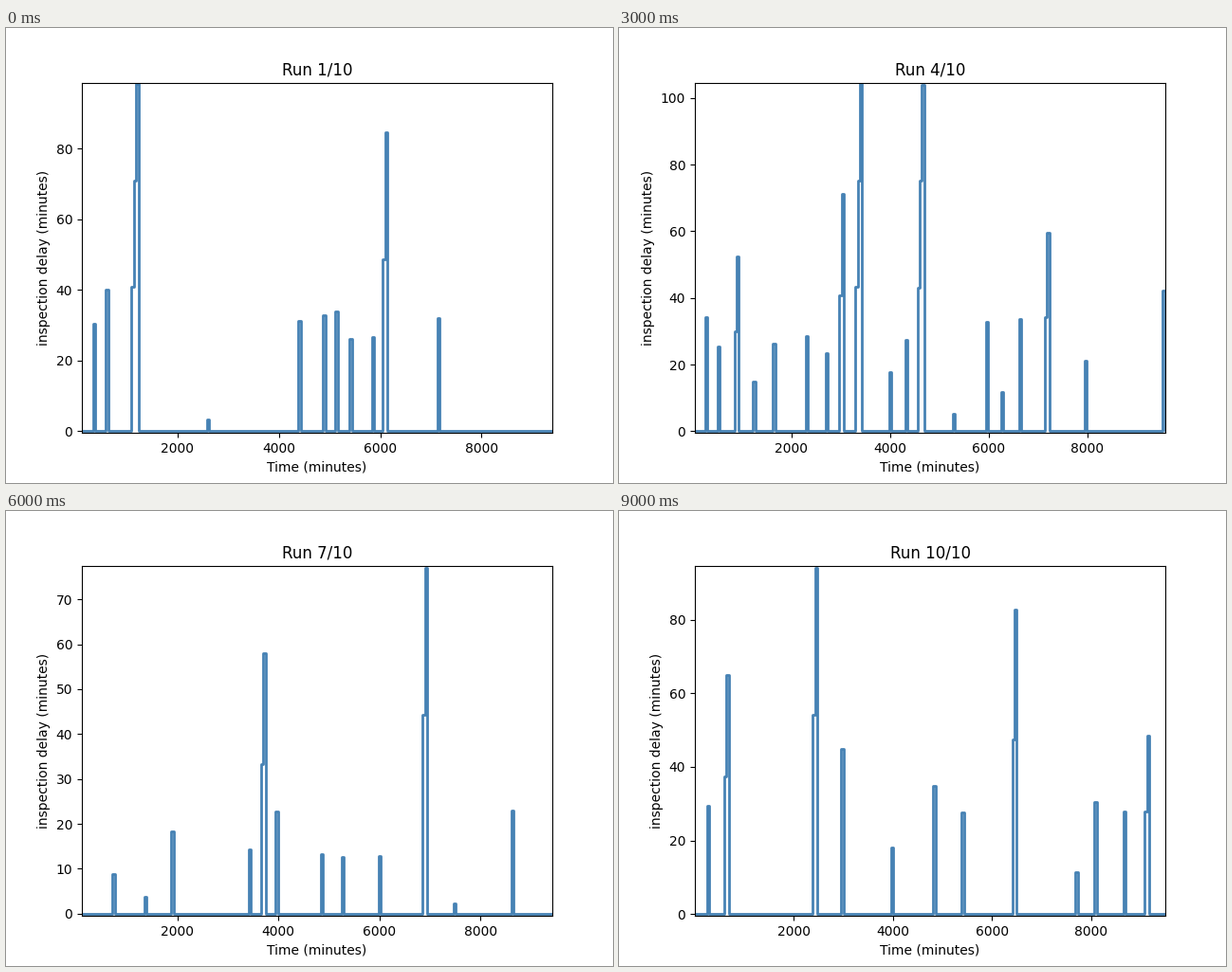
A matplotlib script for the animation above (10 s loop, 640 px wide and 480 px high).

```python
import matplotlib.pyplot as plt
import numpy as np
from matplotlib.animation import FuncAnimation

STEP = 45      # minutes a delay level lasts
CLEAR = 230    # free minutes kept around each burst

# First and last minute, number of minor bursts, main bursts (time, peak delay)
RUNS = [
    (108, 9400, 5, [(585, 40.2), (1181, 98.2), (4382, 31.3), (5112, 33.8),
                    (5835, 26.6), (6096, 84.6)]),
    (95, 9390, 11, [(2600, 62), (8640, 14)]),
    (49, 9310, 10, [(92, 79.9), (3413, 47.9), (3928, 68.9), (5229, 47.2),
                    (6484, 31.7), (7809, 41.5)]),
    (51, 9574, 13, [(895, 52.4), (3023, 71.1), (3393, 104.1), (4649, 103.9),
                    (7183, 59.5), (9520, 42.1)]),
    (223, 9451, 4, [(1056, 44.8), (3586, 43.2), (5149, 43.7), (6213, 34.4),
                    (8181, 27.9), (9162, 17.3)]),
    (77, 9561, 8, [(4034, 103.2), (5949, 46.7), (6232, 67), (6463, 68.5),
                   (7476, 45.7), (9518, 41.1)]),
    (110, 9420, 10, [(3700, 58), (6900, 77)]),
    (147, 9227, 11, [(3881, 37.1), (4811, 69.3), (5446, 71.5), (7465, 55.8),
                     (7941, 26.9), (9168, 30)]),
    (80, 9400, 11, [(1900, 66), (5300, 84)]),
    (4, 9497, 6, [(645, 65.1), (2430, 94.2), (2955, 44.9), (4812, 34.8),
                  (6454, 82.7), (9129, 48.4)]),
]


def add_minor(main, count, start, end, rng):
    """Scatter small bursts where the run is still free."""
    bursts = list(main)
    while len(bursts) < len(main) + count:
        t = rng.uniform(start + 200, end - 700)
        if all(abs(t - other) > CLEAR for other, _ in bursts):
            bursts.append((t, rng.uniform(2, 35)))
    return sorted(bursts)


def climb(t, peak):
    """Times and delays of one burst: taller ones rise in more steps."""
    n = 1 + int(peak // 48)
    k = np.arange(1, n + 1)
    times = t + STEP * np.arange(1 - n, 2)
    return times, np.append(peak * (k / n) ** 0.8, 0)


def steps(i):
    start, end, count, main = RUNS[i]
    rng = np.random.default_rng(i)
    times, delays = [start - 500], [0]
    for burst in add_minor(main, count, start, end, rng):
        t, d = climb(*burst)
        times.extend(t)
        delays.extend(d)
    return times + [end + 500], delays + [0]


fig, ax = plt.subplots(figsize=(6.4, 4.8), dpi=100)
line, = ax.plot([], [], color="steelblue", linewidth=2, drawstyle="steps-post")
ax.set_xlabel("Time (minutes)")
ax.set_ylabel("inspection delay (minutes)")


def draw(i):
    times, delays = steps(i)
    line.set_data(times, delays)
    ax.set_xlim(*RUNS[i][:2])
    ax.set_ylim(-0.5, max(delays) + 0.5)
    ax.set_title(f"Run {i + 1}/{len(RUNS)}")
    return line,


anim = FuncAnimation(fig, draw, frames=len(RUNS), interval=1000,
                     init_func=lambda: draw(0), repeat=True, repeat_delay=0)
plt.show()
```
